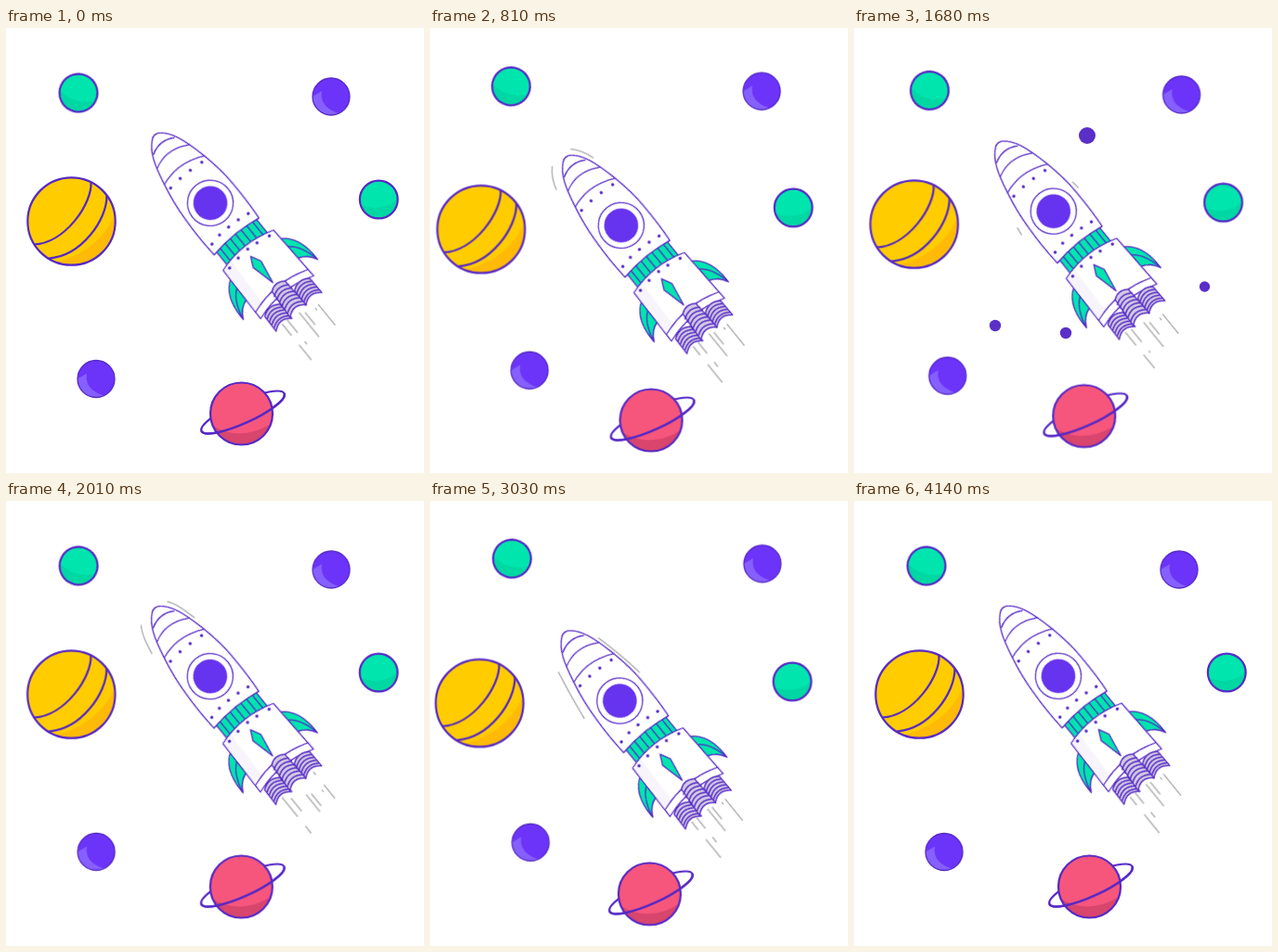
An HTML page without scripts that plays this animation: 450 px wide and 480 px high, repeating every 4170 ms.

```html
<!DOCTYPE html>
<html lang="en">
<head>
<meta charset="utf-8">
<title>Rocket among planets</title>
<style>
html, body { margin: 0; width: 100%; height: 100%; overflow: hidden; background: #fff; }
svg { display: block; width: 450px; height: 480px; }

.line { fill: none; stroke: #5528c6; stroke-width: 1.3; stroke-linejoin: round; }
.white { fill: #fff; }
.green { fill: #00e5ae; }
.metal { fill: #d3cce2; }
.dots { fill: #5528c6; }
.thick { stroke-width: 2.2; }

/* floating bodies: --x/--y is the far end of the swing */
.drift { animation: drift 1042.5ms cubic-bezier(.37, 0, .63, 1) infinite alternate; }
@keyframes drift { to { transform: translate(var(--x), var(--y)); } }

/* exhaust: dashes run down the line, --p is the dash period */
.exhaust path { fill: none; stroke: #a6a6a6; stroke-width: 1.3; animation: exhaust 278ms linear infinite; }
@keyframes exhaust { to { stroke-dashoffset: calc(-1 * var(--p)); } }

/* air streaks sliding from the nose along the hull */
.air { fill: none; stroke: #a0a0a0; stroke-width: 1.2; stroke-dasharray: 0 0 0 200; animation: air 198.571ms linear infinite; }
@keyframes air {
  0%, 2% { stroke-dasharray: 0 0 0 200; }
  4%, 8% { stroke-dasharray: 0 0 25 200; }
  26% { stroke-dasharray: 0 34 57 200; }
  41.7% { stroke-dasharray: 0 54 45 200; }
  46% { stroke-dasharray: 0 87 11 200; }
  49%, 100% { stroke-dasharray: 0 100 0 200; }
}

.star { fill: #5a2fc8; transform-box: fill-box; transform-origin: center; transform: scale(0); animation: 4170ms linear infinite; }
.s1 { animation-name: star1; }
.s2 { animation-name: star2; }
.s3 { animation-name: star3; }
@keyframes star1 { 0%, 8% { transform: scale(0); } 10.5%, 13% { transform: scale(1); } 15.5%, 100% { transform: scale(0); } }
@keyframes star2 { 0%, 25% { transform: scale(0); } 27.5%, 30% { transform: scale(1); } 32.5%, 100% { transform: scale(0); } }
@keyframes star3 { 0%, 36.5% { transform: scale(0); } 39%, 41.5% { transform: scale(1); } 44%, 100% { transform: scale(0); } }
</style>
</head>
<body>
<svg viewBox="0 0 450 480" xmlns="http://www.w3.org/2000/svg">
<defs>
  <g id="mint">
    <circle r="20.3" fill="#00e5ae"/>
    <path d="M-19.5 6Q2 14 20.2 0A20.3 20.3 0 0 1-19.5 6Z" fill="#00d8a3"/>
    <circle class="line thick" r="20.4"/>
  </g>
  <g id="violet">
    <circle r="20" fill="#6c33f9"/>
    <path d="M-20 0Q-15-3-10-6Q-13 11 8 18A20 20 0 0 1-20 0Z" fill="#8560ff"/>
    <circle class="line" r="20"/>
  </g>
  <path id="rib" class="line" d="M-10.500 0Q0-8 10.500 0"/>
  <g id="nozzle">
    <path class="line metal" d="M-10.500 0Q0-8 10.500 0L11 20Q0 10-11 20Z"/>
    <use href="#rib" y="4"/>
    <use href="#rib" y="8"/>
    <use href="#rib" y="12"/>
    <use href="#rib" y="16"/>
  </g>
  <g id="fin">
    <path class="line green" d="M34 77Q52.500 88 51.500 120Q46 108 34 105Z"/>
    <path class="line" d="M35 89Q46 96 51 117"/>
  </g>
</defs>

<!-- stars -->
<circle class="star s1" cx="185" cy="69" r="5.5"/>
<circle class="star s2" cx="357" cy="132" r="6.2"/>
<circle class="star s2" cx="302" cy="196" r="6.2"/>
<circle class="star s2" cx="160" cy="240" r="6.2"/>
<circle class="star s3" cx="251" cy="116" r="9"/>
<circle class="star s3" cx="152" cy="321" r="6.2"/>
<circle class="star s3" cx="228" cy="329" r="6.2"/>
<circle class="star s3" cx="377.5" cy="279" r="5.7"/>

<!-- small planets -->
<g class="drift" style="--x:10.5px;--y:-8px"><use href="#mint" transform="translate(78 70) rotate(25)"/></g>
<g class="drift" style="--x:-11.5px;--y:10px"><use href="#mint" x="401.3" y="185"/></g>
<g class="drift" style="--x:8px;--y:-6.5px"><use href="#violet" x="350" y="74"/></g>
<g class="drift" style="--x:11.5px;--y:-10.5px"><use href="#violet" x="97" y="378.5"/></g>

<!-- yellow planet -->
<g class="drift" style="--x:-17.5px;--y:9.7px">
  <circle cx="70.5" cy="208.5" r="47.2" fill="#ffcc00"/>
  <path d="M117 202Q100 240 54 252.500A47.200 47.200 0 0 0 117 202Z" fill="#ffba08"/>
  <path class="line thick" d="M91.500 166.500C93 189 64 232 30 233.500M108.500 180.500C109 207 81 246 46 248.500"/>
  <circle class="line thick" cx="70.5" cy="208.5" r="47.2"/>
</g>

<!-- ringed planet -->
<g class="drift" style="--x:-17.5px;--y:8px">
  <g transform="translate(255 414.500) rotate(-24.500)"><ellipse class="line thick" rx="49" ry="11.8"/></g>
  <circle cx="253.5" cy="416" r="33.5" fill="#f6567c"/>
  <path d="M222.500 429Q252 447 285 427A33.500 33.500 0 0 1 222.500 429Z" fill="#d8456d"/>
  <circle class="line thick" cx="253.5" cy="416" r="33.5"/>
  <path class="line" style="stroke-width:2.5" transform="translate(255 414.500) rotate(-24.500)" d="M-49 0A49 11.800 0 0 0 49 0"/>
</g>

<!-- rocket: nose up, then tilted -->
<g class="drift" style="--x:-16px;--y:27.3px">
<g transform="translate(220 188.800) rotate(-39)">
  <g class="exhaust">
    <path d="M-22 150V200" style="--p:47px;stroke-dasharray:34px 13px;animation-delay:-172ms"/>
    <path d="M-15 150V184" style="--p:30px;stroke-dasharray:18px 12px"/>
    <path d="M0 150V188" style="--p:52px;stroke-dasharray:34px 18px;animation-delay:-10ms"/>
    <path d="M5 150V188" style="--p:46px;stroke-dasharray:17px 29px;animation-delay:-36ms"/>
    <path d="M16.500 150V200" style="--p:50px;stroke-dasharray:3px 47px;animation-delay:-50ms"/>
    <path d="M21.500 150V187" style="--p:44px;stroke-dasharray:30px 14px;animation-delay:-50ms"/>
  </g>
  <path class="air" pathLength="100" d="M9-99Q19-89 23-74Q33-38 37-1"/>
  <path class="air" pathLength="100" d="M-17-97Q-27-87-30.500-72Q-38-38-43 0"/>

  <use href="#fin"/>
  <use href="#fin" transform="scale(-1 1)"/>

  <path class="line green" d="M-28 40H27.500V66H-28Z"/>
  <path class="line" d="M-22.500 40V66M-15 40V66M-7.500 40V66M0 40V66M7.500 40V66M15 40V66M22.500 40V66"/>

  <!-- lower stage -->
  <path class="line white" d="M-35 65Q0 54 34.500 65.500L37 131Q0 118-36.500 131Z"/>
  <path d="M-34 66Q-27 63-22 62.500L-24 119Q-31 120-35.500 122Z" fill="#f7f5fb"/>
  <path class="line" d="M-36 122Q0 109 37 122"/>
  <path class="line green" d="M-2.500 72L3 83L-1.700 109L-8 83Z"/>
  <g class="dots">
    <circle cx="-28" cy="67.5" r="1.7"/>
    <circle cx="-14" cy="65" r="1.7"/>
    <circle cx="0" cy="64" r="1.7"/>
    <circle cx="12" cy="65" r="1.7"/>
    <circle cx="27" cy="67.5" r="1.7"/>
  </g>

  <use href="#nozzle" x="-21" y="132"/>
  <use href="#nozzle" x="21.5" y="130.5"/>
  <path class="line metal" d="M-8.500 116Q0 109 9.500 116L11 150Q0 140-11 150Z"/>
  <use href="#rib" y="122"/>
  <use href="#rib" y="126.5"/>
  <use href="#rib" y="131"/>
  <use href="#rib" y="135.5"/>
  <use href="#rib" y="140"/>
  <use href="#rib" y="145"/>

  <!-- hull -->
  <path class="line white" d="M-5.500-92.500Q-2-96 4-94C16-86 21-70 26.500-46Q32-20 32-2Q32.500 25 30.500 45.500Q0 40-32 46Q-33.500 20-32-2Q-31-24-26-46C-21-70-16-84-5.500-92.500Z"/>
  <path class="line" d="M-15-79Q0-88 14.500-79M-21-65Q0-76 22-63M-26-46.500Q0-57 27-43.500"/>
  <g class="dots">
    <circle cx="-23" cy="-39.5" r="1.7"/>
    <circle cx="-8.5" cy="-41" r="1.7"/>
    <circle cx="5.5" cy="-41" r="1.7"/>
    <circle cx="20.5" cy="-40" r="1.7"/>
    <circle cx="-26.5" cy="35.5" r="1.7"/>
    <circle cx="-14" cy="33" r="1.7"/>
    <circle cx="-1" cy="32.5" r="1.7"/>
    <circle cx="12" cy="33" r="1.7"/>
    <circle cx="24.5" cy="34.5" r="1.7"/>
  </g>
  <circle class="line white" r="24.6"/>
  <circle r="18.3" fill="#6633ee"/>
</g>
</g>
</svg>
</body>
</html>
```
